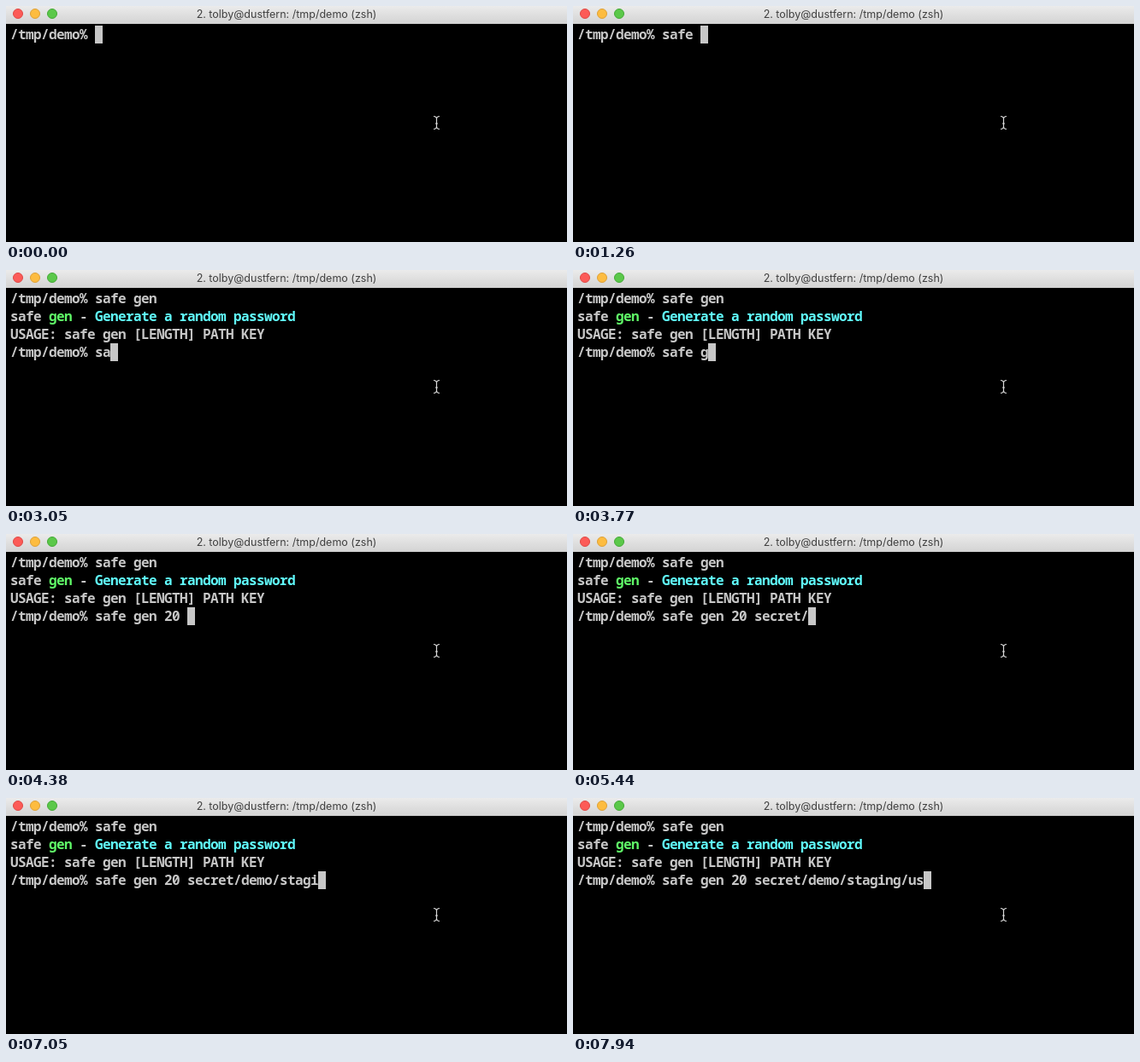
Animation, 656 px wide and 277 px high, one loop 8000 ms. Source, as an HTML page:

```html
<!DOCTYPE html>
<html lang="en">
<head>
<meta charset="utf-8">
<title>Terminal</title>
<style>
  html, body { margin: 0; width: 100%; height: 100%; overflow: hidden; background: #000; }
  svg { display: block; }
  .term text {
    font: 600 16px "Noto Sans Mono", "DejaVu Sans Mono", monospace;
    letter-spacing: -0.6px; white-space: pre; fill: #c7c7c7;
  }
  .term .green { fill: #60fa68; font-weight: 700; }
  .term .cyan { fill: #60fdff; font-weight: 700; }
  .title { font: 12.5px Inter, "Open Sans", sans-serif; fill: #404040; text-anchor: middle; }
</style>
</head>
<body>
<svg width="656" height="277" viewBox="0 0 656 277">
  <defs>
    <linearGradient id="bar" x2="0" y2="1">
      <stop stop-color="#ebebeb"/>
      <stop offset="1" stop-color="#d3d3d3"/>
    </linearGradient>
  </defs>
  <rect width="656" height="277"/>
  <rect width="656" height="21" fill="url(#bar)"/>
  <circle cx="14" cy="9" r="5.5" fill="#fc5b57" stroke="#df4744"/>
  <circle cx="34" cy="9" r="5.5" fill="#fdbc40" stroke="#dea035"/>
  <circle cx="54" cy="9" r="5.5" fill="#5bc849" stroke="#43a935"/>
  <text class="title" x="328" y="14">2. tolby@dustfern: /tmp/demo (zsh)</text>
  <g class="term">
    <rect id="cursor" width="9" height="21" fill="#c7c7c7"/>
    <text id="first" x="5" y="39"></text>
    <g id="reply">
      <text x="5" y="60">safe <tspan class="green">gen</tspan> - <tspan class="cyan">Generate a random password</tspan></text>
      <text x="5" y="81">USAGE: safe gen [LENGTH] PATH KEY</text>
      <text id="second" x="5" y="102"></text>
    </g>
  </g>
  <path fill="none" stroke="#d8d8d8" stroke-width="1.2"
    d="M500 129.5Q503.5 129.7 503.5 132.5V141.5Q503.5 144.3 500 144.5M507 129.5Q503.5 129.7 503.5 132.5M503.5 141.5Q503.5 144.3 507 144.5M502 138H505"/>
</svg>
<script>
  const LOOP = 8000, ENTER = 1870, PROMPT = "/tmp/demo% ";
  const REFRESH = 89.1; // ms between screen updates
  const PACE = 76;      // ms per key within a burst
  const get = id => document.getElementById(id);

  // Bursts of typing: [text, time of the first key]
  const usage = [["sa", 800], ["fe ", 1065], ["gen", 1345]];
  const command = [
    ["sa", 2935], ["fe ", 3125], ["gen ", 3740], ["20", 4105], [" ", 4360],
    ["s", 4805], ["ec", 4905], ["ret/", 5165], ["demo", 5800], ["/", 6230],
    ["staging", 6690], ["/", 7480], ["us", 7835]
  ];

  function typed(bursts, t) {
    const part = ([text, start]) => text.slice(0, Math.max(0, Math.ceil((t - start) / PACE)));
    return PROMPT + bursts.map(part).join("");
  }

  const start = performance.now();
  function draw(now) {
    const elapsed = Math.max(0, now - start) % LOOP;
    const t = Math.floor(elapsed / REFRESH) * REFRESH;
    const entered = t >= ENTER;
    const first = typed(usage, t), second = typed(command, t);
    get("first").textContent = first;
    get("second").textContent = second;
    get("reply").style.display = entered ? "" : "none";
    get("cursor").setAttribute("x", 5 + 9 * (entered ? second : first).length);
    get("cursor").setAttribute("y", entered ? 86 : 23);
    requestAnimationFrame(draw);
  }
  draw(start);
</script>
</body>
</html>
```
